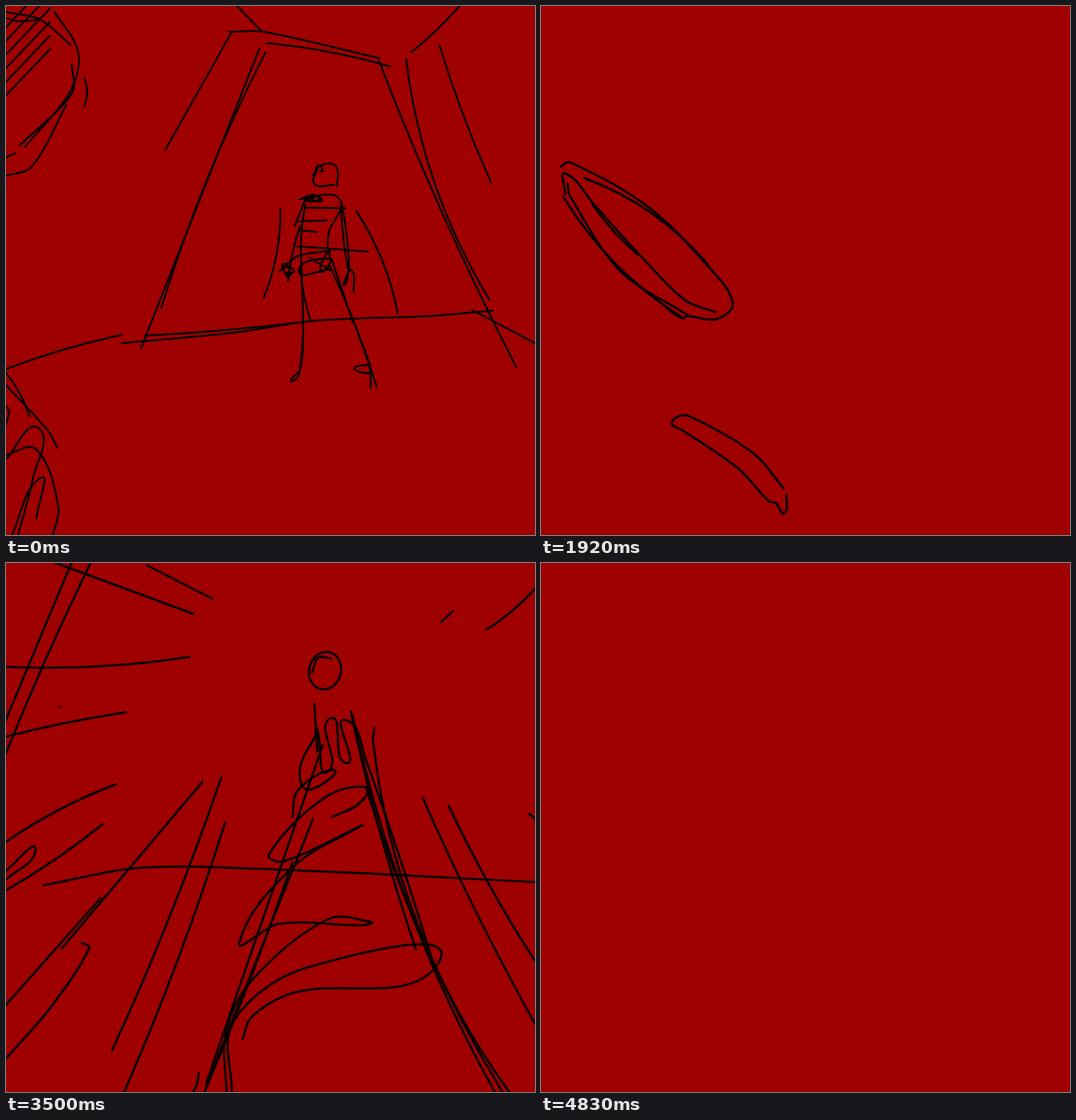
An HTML page with a canvas that plays this animation: 698 px wide and 698 px high, repeating every 5.08 s.

```html
<!DOCTYPE html>
<html lang="en">
<head>
<meta charset="utf-8">
<title>Red storyboard</title>
<style>
html, body { margin: 0; width: 100%; height: 100%; overflow: hidden; background: #9f0000; }
canvas { display: block; width: 100%; height: 100%; }
</style>
</head>
<body>
<canvas id="stage" width="698" height="698"></canvas>
<script>
const SIZE = 698, LOOP = 5080, FIRST = 166.67, STEP = 83.3;
const ctx = document.getElementById('stage').getContext('2d');
ctx.lineCap = ctx.lineJoin = 'round';

let seed = 1;
function random() {
  seed = seed * 16807 % 2147483647;
  return seed / 2147483647;
}

// One curved stroke; bend is how far its middle leaves the straight line.
function bow(x1, y1, x2, y2, bend = 0) {
  const dx = x2 - x1, dy = y2 - y1, k = 2 * bend / Math.hypot(dx, dy);
  ctx.beginPath();
  ctx.moveTo(x1, y1);
  ctx.quadraticCurveTo((x1 + x2) / 2 - dy * k, (y1 + y2) / 2 + dx * k, x2, y2);
  ctx.stroke();
}

// Smooth stroke through x, y pairs; handles follow the neighbours' direction.
function pen(...p) {
  const last = p.length / 2 - 1;
  const at = i => { const k = 2 * Math.max(0, Math.min(last, i)); return [p[k], p[k + 1]]; };
  const handle = (i, reach) => {
    const a = at(i - 1), b = at(i), c = at(i + 1);
    const k = reach / (Math.hypot(c[0] - a[0], c[1] - a[1]) || 1);
    return [b[0] + (c[0] - a[0]) * k, b[1] + (c[1] - a[1]) * k];
  };
  ctx.beginPath();
  ctx.moveTo(p[0], p[1]);
  for (let i = 0; i < last; i++) {
    const b = at(i), c = at(i + 1), reach = Math.hypot(c[0] - b[0], c[1] - b[1]) / 3;
    ctx.bezierCurveTo(...handle(i, reach), ...handle(i + 1, -reach), ...c);
  }
  ctx.stroke();
}

function oval(x, y, rx, ry, turn = 0) {
  ctx.beginPath();
  ctx.ellipse(x, y, rx, ry, turn, 0, 7);
  ctx.stroke();
}

// Random back-and-forth strokes inside a box.
function scrawl(x, y, w, h, turns) {
  const p = [];
  for (let i = 0; i < turns; i++) p.push(x + w * random(), y + h * random());
  pen(...p);
}

function view(x, y, zoom) {
  ctx.translate(x, y);
  ctx.scale(zoom, zoom);
  ctx.translate(-x, -y);
}

function boulders() {
  pen(0, 8, 45, 18, 85, 51);
  pen(64, 8, 95, 60, 85, 112, 25, 186);
  pen(87, 78, 87, 115, 18, 184);
  bow(103, 95, 103, 132, -4);
  pen(0, 224, 34, 212, 80, 130);
  bow(0, 200, 12, 194);
  for (let y = 118; y > 20; y -= 18) {
    const run = Math.min(58, y / 1.05);
    bow(0, y, run, y - 1.05 * run);
  }
  pen(0, 16, 16, 20, 45, 18);
  bow(0, 484, 31, 541, -3);
  pen(0, 500, 55, 560, 68, 583);
  pen(0, 528, 4, 535, 0, 552);
  pen(0, 592, 40, 585, 69, 660, 62, 698);
  pen(0, 598, 43, 557, 35, 625, 16, 698);
  pen(8, 698, 45, 623, 40, 676);
}

function room() {
  bow(303, -2, 337, 33);
  pen(295, 34, 340, 34, 493, 69);
  bow(344, 49, 507, 80, -4);
  bow(297, 36, 210, 190);
  bow(334, 57, 178, 452);
  bow(342, 62, 205, 398, 8);
  bow(600, -2, 535, 61, -2);
  bow(572, 52, 640, 233, 3);
  bow(528, 70, 638, 388, 18);
  bow(492, 72, 673, 476, 6);
  pen(153, 445, 300, 431, 410, 415, 560, 409, 642, 402);
  bow(183, 435, 400, 416, 2);
  bow(152, 434, 0, 479, 3);
  bow(615, 401, 698, 445);
}

function walker() {
  seed = 11;
  pen(405, 224, 414, 211, 435, 211, 437, 238);
  pen(411, 213, 407, 235, 433, 236);
  scrawl(408, 210, 12, 18, 4);
  bow(362, 268, 340, 385, -6);
  bow(462, 270, 517, 405, -7);
  bow(384, 317, 478, 324);
  pen(387, 255, 431, 249, 443, 263, 427, 295, 424, 320);
  scrawl(386, 248, 50, 12, 8);
  bow(394, 266, 448, 267);
  bow(397, 250, 381, 290);
  bow(395, 262, 390, 345, 3);
  bow(385, 284, 423, 283);
  bow(387, 296, 410, 298);
  for (let i = 0; i < 2; i++) bow(442 + i, 262, 452 + i, 350, 2 - 4 * i);
  pen(452, 350, 447, 368, 455, 348, 459, 377);
  bow(388, 290, 372, 363, 2);
  scrawl(366, 335, 16, 28, 6);
  scrawl(378, 324, 52, 32, 8);
  pen(361, 350, 385, 330, 428, 323);
  pen(390, 345, 392, 440, 388, 480, 376, 494, 386, 488, 392, 435);
  bow(388, 345, 402, 416, 2);
  bow(426, 340, 489, 502, -3);
  bow(430, 335, 458, 418);
  scrawl(460, 457, 22, 30, 5);
  bow(466, 438, 481, 504, -5);
}

function helmet() {
  seed = 5;
  pen(380, 428, 382, 386, 440, 379, 482, 384, 532, 402);
  pen(420, 374, 470, 377, 555, 398, 559, 430, 547, 470, 554, 555);
  pen(439, 373, 441, 366, 470, 363, 517, 380, 485, 383);
  oval(444, 403, 56, 23, .06);
  oval(443, 406, 56, 27, .1);
  pen(409, 405, 415, 390, 440, 382, 467, 418, 453, 451);
  bow(355, 463, 440, 386, 6);
  bow(359, 420, 403, 458);
  bow(361, 421, 424, 422, 10);
  bow(390, 417, 480, 602, -4);
  oval(448, 482, 35, 52, -.2);
  bow(464, 470, 455, 530, -15);
  for (let i = 0; i < 3; i++) bow(416 - 4 * i, 422 + 4 * i, 387, 496 - 4 * i, -10 + 4 * i);
  scrawl(388, 425, 26, 22, 7);
  bow(383, 485, 420, 518);
  for (let i = 0; i < 2; i++) bow(387 + 9 * i, 460 + 35 * i, 414, 546, 4);
  scrawl(402, 492, 14, 48, 7);
  bow(510, 429, 521, 435);
  bow(539, 508, 553, 425, -4);
  bow(542, 430, 565, 540, -4);
  bow(563, 485, 552, 567, 3);
}

function cloak() {
  pen(370, 538, 385, 530, 440, 527, 558, 541, 568, 600, 583, 698);
  pen(359, 563, 420, 545, 480, 517, 530, 533, 555, 610, 574, 698);
  pen(365, 563, 420, 549, 512, 550, 553, 595, 574, 698);
  pen(350, 577, 380, 557, 430, 542, 507, 544);
  pen(362, 569, 400, 555, 497, 560, 490, 554);
  bow(378, 544, 314, 698, -3);
  bow(390, 555, 316, 698, -5);
  pen(388, 560, 335, 655, 298, 698);
  bow(309, 671, 318, 698, 4);
  bow(482, 520, 521, 698, -5);
  bow(526, 590, 556, 698, 4);
  bow(535, 535, 564, 698, -5);
  bow(539, 427, 634, 698, -9);
  bow(298, 698, 272, 1050, 10);
  for (const x of [315, 521, 564, 574, 583, 634]) bow(x, 698, x, 1050);
}

function blades() {
  pen(26, 212, 38, 206, 140, 264, 220, 343, 253, 392, 232, 413, 193, 409, 186, 412, 165, 398);
  bow(57, 227, 220, 341, -13);
  pen(32, 248, 32, 221, 70, 262, 130, 328, 190, 388, 230, 404);
  pen(35, 234, 38, 250, 105, 350, 194, 408);
  bow(29, 251, 186, 411, 13);
  bow(68, 262, 128, 328, 3);
  pen(320, 636, 280, 590, 195, 541, 178, 543, 173, 552, 187, 560, 260, 610, 300, 653, 310, 656, 321, 669, 324, 645);
}

function mask() {
  bow(325, 119, 341, 120);
  bow(342, 121, 340, 163);
  bow(330, 120, 326, 168);
  bow(318, 165, 418, 163, -7);
  bow(324, 170, 421, 163, -3);
  pen(363, 134, 364, 152, 375, 165);
  bow(363, 139, 384, 137);
  bow(384, 137, 381, 160);
  pen(404, 160, 407, 122, 419, 163);
  bow(340, 172, 277, 272, 2);
  bow(414, 140, 480, 281, 2);
  bow(284, 282, 440, 283, -7);
  bow(288, 279, 475, 278, 10);
  bow(281, 268, 355, 434, 2);
  bow(472, 278, 393, 432);
  bow(354, 431, 422, 428);
  bow(422, 428, 452, 331);
  oval(384, 474, 43, 43);
  pen(327, 458, 375, 450, 410, 490, 390, 513, 347, 485, 346, 452, 378, 439, 412, 458, 419, 480);
}

function coat() {
  pen(272, 277, 238, 320, 256, 355, 295, 431);
  bow(256, 358, 308, 430);
  bow(284, 408, 308, 430);
  pen(252, 365, 250, 392, 235, 425, 236, 560, 252, 602);
  bow(246, 447, 239, 451);
  bow(319, 335, 307, 580, 18);
  bow(327, 380, 320, 528, 2);
  bow(335, 402, 326, 530, 5);
  bow(468, 250, 529, 512, 4);
  pen(500, 285, 505, 340, 522, 500, 512, 580);
  bow(512, 580, 445, 335, -9);
  bow(462, 346, 497, 500, 6);
  bow(449, 335, 512, 535, 6);
  pen(495, 351, 558, 390, 578, 490, 570, 620);
  bow(547, 485, 566, 657, 3);
  pen(341, 602, 326, 608, 420, 629, 515, 611);
  bow(338, 620, 470, 624, 2);
  bow(303, 607, 334, 698, 8);
  const tips = [[512, 234], [525, 297], [497, 316], [484, 272]];
  tips.forEach((tip, i) => bow(...tip, ...tips[(i + 1) % 4], 7));
}

function sleeves() {
  bow(317, 525, 365, 560);
  bow(336, 520, 367, 556);
  bow(336, 520, 208, 657);
  bow(365, 559, 226, 698);
  pen(287, 558, 235, 585, 192, 635, 210, 664);
  bow(283, 557, 306, 576);
  bow(290, 568, 212, 672);
  bow(212, 672, 240, 698);
  bow(235, 583, 230, 618);
  bow(222, 677, 236, 696);
  bow(285, 651, 262, 698);
  bow(413, 533, 427, 544);
  bow(425, 541, 461, 514);
  bow(461, 514, 557, 640);
  bow(427, 543, 525, 684);
  pen(425, 542, 485, 543, 550, 640);
  bow(493, 562, 560, 597, -9);
  pen(524, 680, 547, 670, 553, 653);
  pen(570, 615, 586, 650, 578, 683, 586, 700);
  bow(477, 680, 470, 698);
}

function rays() {
  for (let i = 0; i < 2; i++) bow(90 + 26 * i, -9, -6, 221 + 45 * i, 3 * i);
  bow(66, 0, 247, 67);
  bow(186, 3, 272, 47);
  bow(0, 137, 242, 124, 6);
  bow(71, 190, 72, 190);
  bow(0, 229, 158, 197, -2);
  bow(0, 368, 145, 292, -5);
  bow(0, 432, 127, 345, 3);
  pen(0, 406, 39, 378, 0, 418);
  bow(259, 289, 74, 508);
  bow(125, 442, 0, 583);
  pen(100, 501, 110, 508, 60, 585, 0, 654);
  bow(284, 283, 140, 643, -5);
  bow(289, 343, 156, 698, -5);
  bow(254, 673, 247, 698, -2);
  bow(574, 78, 590, 63);
  bow(634, 88, 698, 34, 3);
  bow(690, 331, 698, 337);
  for (let i = 0; i < 2; i++) bow(550 + 34 * i, 310 + 10 * i, 698, 608 - 83 * i, 4);
  pen(50, 425, 180, 402, 370, 405, 698, 421);
}

function climber() {
  oval(421, 142, 21, 25, .25);
  pen(429, 126, 412, 125, 404, 144);
  pen(407, 186, 411, 247, 410, 218, 425, 275, 428, 205, 449, 264, 447, 207, 478, 268);
  bow(478, 268, 568, 543, -2);
  bow(455, 196, 541, 510, 5);
  bow(457, 200, 645, 698, 20);
  bow(475, 296, 655, 698, 14);
  bow(484, 232, 664, 698, 33);
  bow(486, 218, 484, 232);
  pen(410, 225, 388, 270, 398, 299, 432, 273, 385, 300, 378, 335);
  bow(418, 240, 264, 687);
  bow(405, 338, 265, 688);
  bow(378, 395, 262, 698, -3);
  pen(431, 335, 465, 318, 477, 296, 420, 310, 347, 384, 365, 394, 470, 346);
  pen(470, 346, 380, 400, 308, 500, 360, 476, 470, 478, 483, 474, 425, 470, 325, 550, 290, 620, 291, 698);
  pen(312, 628, 325, 598, 380, 567, 571, 527, 400, 533, 300, 605, 298, 698);
}

function arcs() {
  bow(498, 220, 22, 699, 35);
  bow(293, 353, 0, 670, 14);
  bow(293, 353, 0, 632, 10);
  bow(208, 417, 0, 643, 14);
  bow(473, 340, 152, 699, 21);
  bow(615, 289, 193, 699, 37);
  for (let i = 0; i < 3; i++) bow(388 - i, 452, 193 + 9 * i, 699, 11 - 3 * i);
  bow(422, 478, 223, 699, 15);
  bow(487, 352, 504, 338);
  bow(633, 246, 513, 335, 11);
  bow(563, 275, 698, 168, -9);
  bow(547, 222, 698, 139, -7);
  bow(600, 211, 693, 158);

  bow(0, 112, 390, 456, 31);
  bow(0, 391, 118, 482, 4);
  bow(0, 588, 111, 641, 4);
  bow(618, 156, 698, 235, 4);
  bow(395, 206, 659, 407, 8);
  bow(407, 316, 651, 557, 2);
  bow(527, 395, 698, 512, 4);
  bow(510, 552, 698, 659, 3);
  bow(692, 375, 698, 378);
  bow(164, 529, 360, 698, 8);
  pen(500, 698, 385, 610, 275, 539, 280, 558, 340, 618, 436, 698);
  pen(0, 626, 27, 650, 0, 637);
}

// Height of the rising figure: a climb, then a short settle.
function rise(n) {
  return n < 12 ? -86 * (n - 7) : Math.min(-282, -344 + 21 * (n - 11));
}

// Each shot lasts until drawing `end`; `pose` moves it around its key drawing.
const shots = [
  { end: 5, color: '#080000', width: 2.5, pose: n => view(420, 330, 1 + .03 * n), parts: [boulders, room, walker] },
  { end: 19, color: '#0d0000', width: 2.4, pose: n => ctx.translate(0, rise(n)), parts: [helmet, cloak] },
  { end: 29, color: '#060000', width: 3, pose: n => ctx.translate(85 * (n - 22), -18 * (n - 22)), parts: [blades] },
  { end: 37, color: '#24181a', width: 2.6, pose: n => view(384, 350, 1 + .02 * (n - 30)), parts: [mask, coat, sleeves] },
  { end: 46, color: '#0a0000', width: 3, pose: n => view(420, 150, 1 + .03 * (n - 41)), parts: [rays, climber] },
  { end: 56, color: '#180a0a', width: 3, pose: n => view(349, 349, 1 + .05 * (n - 50)), parts: [arcs] },
  { end: 57, color: '#180a0a', width: 3, pose: () => {}, parts: [() => bow(0, 305, 698, 322, 2)] }
];

function draw(n) {
  ctx.setTransform(1, 0, 0, 1, 0, 0);
  ctx.fillStyle = '#9f0000';
  ctx.fillRect(0, 0, SIZE, SIZE);
  const shot = shots.find(s => n < s.end);
  if (!shot) return;
  ctx.strokeStyle = shot.color;
  ctx.lineWidth = shot.width;
  shot.pose(n);
  shot.parts.forEach(part => part());
}

// Drawing number on screen; starts fall on whole hundredths of a second.
function drawingAt(t) {
  if (t < 170) return 0;
  return Math.floor((Math.floor(t / 10) * 10 + 4.99 - FIRST) / STEP) + 1;
}

const start = performance.now();
let shown = -1;
function tick() {
  const n = Math.min(57, drawingAt((performance.now() - start) % LOOP));
  if (n !== shown) draw(shown = n);
  requestAnimationFrame(tick);
}
tick();
</script>
</body>
</html>
```
